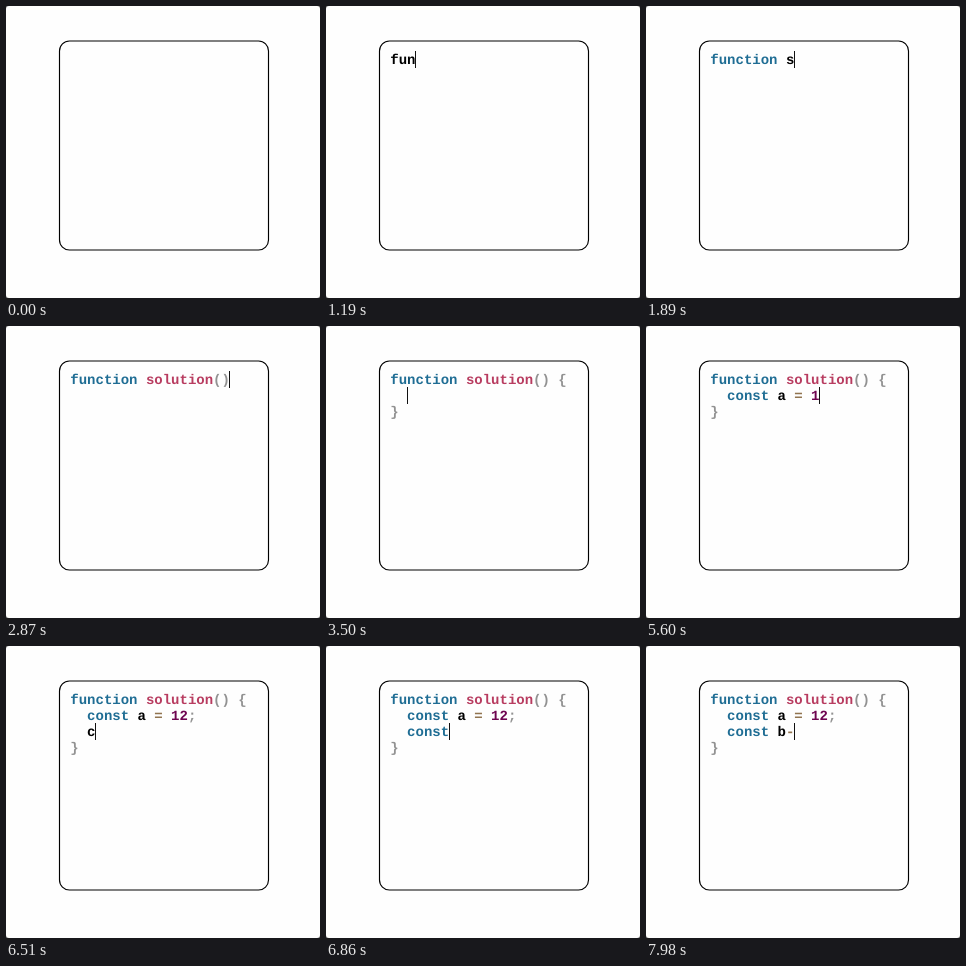
An HTML page for the animation above (8000 ms loop, 314 px wide and 292 px high).

```html
<!DOCTYPE html>
<html lang="en">
<head>
<meta charset="utf-8">
<title>Typing code</title>
<style>
  html, body { margin: 0; width: 100%; height: 100%; overflow: hidden; background: #fefefe; }
  svg { display: block; width: 314px; height: 292px; }
  text {
    font: bold 14px "Liberation Mono", monospace;
    white-space: pre;
    text-rendering: geometricPrecision;
  }
  .plain { fill: #000; }
  .keyword { fill: #1f6d94; }
  .name { fill: #b83c60; }
  .number { fill: #6e0550; }
  .operator { fill: #917450; }
  .punct { fill: #929292; }
</style>
</head>
<body>
<svg viewBox="0 0 314 292">
  <rect width="314" height="292" fill="#555"/>
  <rect width="314" height="292" rx="3" fill="#fefefe"/>
  <rect x="53.5" y="35" width="209" height="209" rx="10" fill="none" stroke="#000" stroke-width="1.15"/>
  <g id="code"></g>
  <rect id="caret" width="1" height="17" fill="#111"/>
</svg>
<script>
const LOOP = 8000, LEFT = 64.3, TOP = 45, CHAR = 8.4, LINE = 16, BASE = 13;
const code = document.getElementById('code');
const caret = document.getElementById('caret');

const states = [{ time: 0, text: '', pos: 0, on: false }];

// Insert text at the caret; tail is text placed behind it.
function add(time, text, tail = '') {
  const s = states[states.length - 1];
  states.push({
    time,
    text: s.text.slice(0, s.pos) + text + tail + s.text.slice(s.pos),
    pos: s.pos + text.length,
    on: true
  });
}

function type(text, times) {
  times.forEach((t, i) => add(t, text[i]));
}

function blink(time, on) {
  states.push({ ...states[states.length - 1], time, on });
}

function erase(time) {
  const s = states[states.length - 1];
  states.push({
    time,
    text: s.text.slice(0, s.pos - 1) + s.text.slice(s.pos),
    pos: s.pos - 1,
    on: true
  });
}

blink(420, true);
blink(910, false);
type('function s', [980, 1120, 1190, 1260, 1400, 1470, 1540, 1610, 1750, 1890]);
type('olution', [1960, 2100, 2170, 2310, 2380, 2450, 2590]);
add(2870, '()');
add(3080, ' ');
add(3290, '{', '}');
add(3500, '\n  ', '\n');
blink(4060, false);
type('const a', [4130, 4200, 4340, 4410, 4480, 4620, 4830]);
type(' = ', [5110, 5180, 5320]);
type('12;', [5600, 5670, 5880]);
add(6090, '\n  ');
type('const b', [6510, 6580, 6650, 6790, 6860, 7000, 7140]);
type('-=', [7490, 7630]);
erase(7980);

const TOKENS = /(\b(?:function|const)\b)|(\w+(?=\())|(\b\d+\b)|([=-]+)|([(){};])|(\w+)/g;
const KINDS = ['keyword', 'name', 'number', 'operator', 'punct', 'plain'];

function drawLine(line, row) {
  for (const m of line.matchAll(TOKENS)) {
    const el = document.createElementNS('http://www.w3.org/2000/svg', 'text');
    el.setAttribute('class', KINDS[m.slice(1).findIndex(Boolean)]);
    el.setAttribute('x', LEFT + m.index * CHAR);
    el.setAttribute('y', TOP + BASE + row * LINE);
    el.textContent = m[0];
    code.append(el);
  }
}

let shown = null;

function render(time) {
  const state = states.findLast(s => s.time <= time);
  if (state === shown) return;
  shown = state;
  code.replaceChildren();
  state.text.split('\n').forEach(drawLine);
  const before = state.text.slice(0, state.pos).split('\n');
  const row = before.length - 1;
  caret.setAttribute('x', Math.floor(LEFT + before[row].length * CHAR));
  caret.setAttribute('y', TOP + row * LINE);
  caret.setAttribute('visibility', state.on ? 'visible' : 'hidden');
}

const start = performance.now();
function tick() {
  render((performance.now() - start) % LOOP);
  requestAnimationFrame(tick);
}
tick();
</script>
</body>
</html>
```
